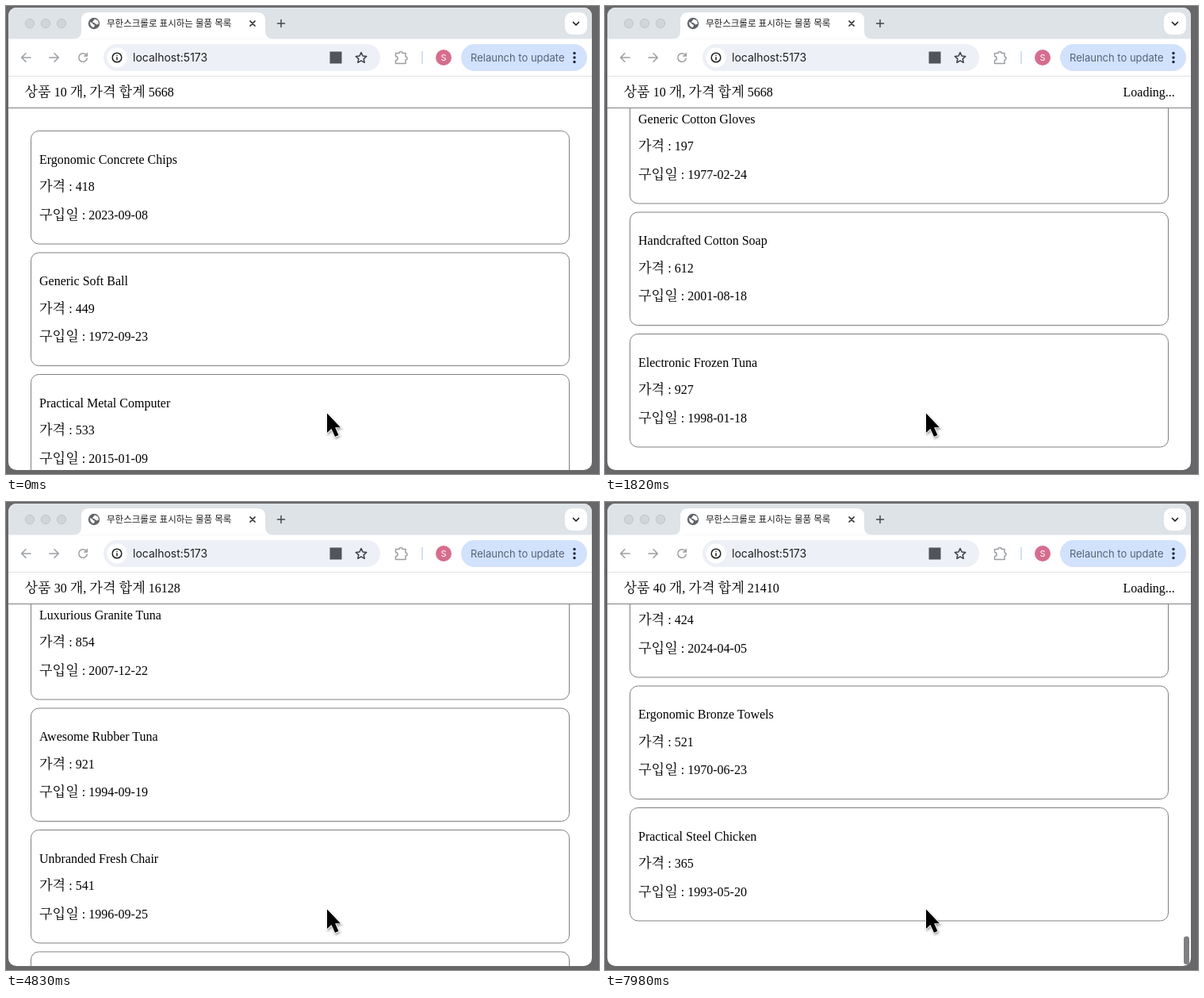
An HTML page for the animation above (8 s loop, 748 by 590 pixels).

```html
<!DOCTYPE html>
<html lang="ko">
<head>
<meta charset="utf-8">
<title>무한스크롤</title>
<style>
  html, body { margin: 0; width: 100%; height: 100%; overflow: hidden; background: #67676a; }
  svg { display: block; width: 748px; height: 590px; }
  text { white-space: pre; }
  .page { font: 16px "Liberation Serif", "Noto Serif CJK KR", "Noto Sans CJK KR", "Noto Sans CJK", serif; fill: #000; }
  .ko { font-size: 17.2px; font-weight: 300; }
  .ui { font-family: Inter, "Noto Sans CJK KR", "Noto Sans CJK", sans-serif; }
  .line { fill: none; stroke-linecap: round; stroke-linejoin: round; }
</style>
</head>
<body>
<svg viewBox="0 0 748 590" xmlns="http://www.w3.org/2000/svg">
  <defs>
    <clipPath id="window"><rect x="3" y="2" width="736" height="583" rx="10"/></clipPath>
    <clipPath id="view"><rect x="3" y="129" width="736" height="456"/></clipPath>
    <filter id="shadow" x="-50%" y="-50%" width="200%" height="200%">
      <feDropShadow dx="1" dy="2" stdDeviation="1.6" flood-opacity=".4"/>
    </filter>
  </defs>
  <rect width="748" height="590" fill="#67676a"/>
  <g clip-path="url(#window)">
    <rect x="3" y="2" width="736" height="583" fill="#fff"/>

    <g class="page">
      <g clip-path="url(#view)"><g id="list"></g></g>
      <path d="M3 128.5H739" stroke="#808080"/>
      <text id="summary" x="23.5" y="113.5"></text>
      <text id="loading" x="653.5" y="113.5">Loading...</text>
    </g>
    <rect id="thumb" x="730" width="7" rx="3.5" fill="#7f7f7f"/>

    <g class="ui">
      <rect x="3" y="2" width="736" height="39.5" fill="#dee3e7"/>
      <g fill="#d2d5d8" stroke="#c3c6c9">
        <circle cx="30" cy="22" r="5.7"/><circle cx="50" cy="22" r="5.7"/><circle cx="70" cy="22" r="5.7"/>
      </g>
      <path d="M85 41.5Q95 41.5 95 32V18Q95 8 105 8H317Q327 8 327 18V32Q327 41.5 337 41.5Z" fill="#fff"/>
      <circle cx="111" cy="22" r="7.2" fill="#5f6368"/>
      <path d="M106 20q3 1 4 3l2 1-1 3q-5 0-5-7zM112 16.5l4 2 1 4-3 1-2-2-3-1 1-2z" fill="#fff"/>
      <text x="127" y="26" font-size="11.5" font-weight="500" fill="#1f1f1f">무한스크롤로 표시하는 물품 목록</text>
      <g class="line" stroke="#2a2b2d" stroke-width="1.7">
        <path d="M308 19l6 6m0-6l-6 6"/>
        <path d="M342.500 22h9m-4.500-4.500v9" stroke="#44474a" stroke-width="1.5"/>
      </g>
      <rect x="705" y="8" width="28" height="28" rx="9" fill="#fff"/>
      <path class="line" d="M715.500 20.500l3.500 3.500 3.500-3.500" stroke="#1f1f1f" stroke-width="1.7"/>

      <path d="M3 88.500H739" stroke="#dfe1e4"/>
      <g class="line" stroke="#9b9ea2" stroke-width="1.5">
        <path d="M31 65H20m5-5.300L19.700 65 25 70.300"/>
        <path d="M55 65H66m-5-5.300L66.300 65 61 70.300"/>
        <path d="M101.500 62a5.300 5.300 0 1 0 .8 4.300M102.300 59.500v3.500h-3.700"/>
        <path d="M491.500 59.500h4.500a2 2 0 0 1 4 0h4v4.500a2 2 0 0 1 0 4v4.500h-12.500v-4a2.300 2.300 0 0 0 0-5z"/>
      </g>
      <rect x="123" y="48" width="349" height="34" rx="17" fill="#edf0f6"/>
      <circle cx="140" cy="65" r="12.500" fill="#fff"/>
      <g class="line" stroke="#1f1f1f" stroke-width="1.500">
        <circle cx="140" cy="65" r="5.800"/><path d="M140 64.800v3M140 62.200v.1"/>
        <path d="M448 58.500l2 4.400 4.800.5-3.600 3.200 1 4.700-4.200-2.400-4.200 2.400 1-4.700-3.600-3.200 4.800-.5z" stroke="#3c4043"/>
      </g>
      <text x="160" y="70" font-size="14" fill="#1f1f1f">localhost:5173</text>
      <rect x="408.500" y="57.500" width="15" height="15" fill="#515458"/>
      <path d="M525 57v16" stroke="#c5d6f2" stroke-width="1.500"/>
      <circle cx="552" cy="65" r="10" fill="#d56d8e"/>
      <text x="552" y="69" font-size="11" fill="#fff" text-anchor="middle">S</text>
      <rect x="574" y="48" width="159" height="34" rx="17" fill="#d2e2fc"/>
      <text x="586" y="69.700" font-size="13" fill="#566179">Relaunch to update</text>
      <g fill="#1f2633"><circle cx="717" cy="59.500" r="1.700"/><circle cx="717" cy="65" r="1.700"/><circle cx="717" cy="70.500" r="1.700"/></g>
    </g>
  </g>
  <path d="M405 513.500V538l5.500-5 4.500 10 4.500-2-4.300-9.800h6.800z" fill="#000" stroke="#fff" stroke-width="1.500"
        paint-order="stroke" filter="url(#shadow)"/>
</svg>
<script>
const LOOP = 8000, STEP = 70;
const FIRST = 157, PITCH = 153.5, FETCH = 1575;
const VIEW = 496, VIEW_TOP = 89;
const $ = id => document.getElementById(id);
const restScroll = count => FIRST + PITCH * (count - 1) - 413;

const known = {
  0: ['Ergonomic Concrete Chips', 418, '2023-09-08'],
  1: ['Generic Soft Ball', 449, '1972-09-23'],
  2: ['Practical Metal Computer', 533, '2015-01-09'],
  8: ['Handcrafted Cotton Soap', 612, '2001-08-18'],
  9: ['Electronic Frozen Tuna', 927, '1998-01-18'],
  15: ['Rustic Plastic Hat', 86, '1981-09-10'],
  16: ['Electronic Fresh Towels', 347, '2015-12-30'],
  17: ['Luxurious Granite Tuna', 854, '2007-12-22'],
  18: ['Awesome Rubber Tuna', 921, '1994-09-19'],
  19: ['Unbranded Fresh Chair', 541, '1996-09-25'],
  27: ['Generic Granite Chicken', 501, '2003-08-04'],
  28: ['Oriental Wooden Shoes', 509, '1984-01-26'],
  29: ['Luxurious Granite Car', 286, '2004-06-25'],
  37: ['Modern Cotton Table', 424, '2024-04-05'],
  38: ['Ergonomic Bronze Towels', 521, '1970-06-23'],
  39: ['Practical Steel Chicken', 365, '1993-05-20']
};
const words = [
  ['Generic', 'Rustic', 'Handmade', 'Practical', 'Elegant', 'Recycled'],
  ['Wooden', 'Soft', 'Metal', 'Cotton', 'Bronze', 'Fresh'],
  ['Chair', 'Gloves', 'Pizza', 'Keyboard', 'Salad', 'Bike']
];

let seed = 7;
const random = n => (seed = seed * 16807 % 2147483647) % n;
const two = n => String(n + 1).padStart(2, '0');
const makeItem = () => [
  words.map(list => list[random(6)]).join(' '),
  100 + random(850),
  `${1970 + random(54)}-${two(random(12))}-${two(random(28))}`
];
const ko = s => s.replace(/[가-힣]+/g, '<tspan class="ko">$&</tspan>');

const cards = Array.from({ length: 40 }, (_, i) => {
  const [name, price, date] = known[i] || makeItem();
  const g = document.createElementNS('http://www.w3.org/2000/svg', 'g');
  g.setAttribute('transform', `translate(0 ${FIRST + PITCH * i})`);
  g.innerHTML = `<rect x="31.5" y=".5" width="679" height="142.5" rx="10" fill="#fff" stroke="#808080"/>
    <text x="42" y="41.5">${name}</text>
    <text x="42" y="76">${ko(`가격 : ${price}`)}</text>
    <text x="42" y="111.5">${ko(`구입일 : ${date}`)}</text>`;
  return $('list').appendChild(g);
});

// load time, item count, price total
const pages = [[0, 10, 5668], [2520, 20, 11088], [4830, 30, 16128], [7070, 40, 21410], [9485]];
const barSpans = [[210, 1680], [2870, 4410], [5250, 6720], [7140, 9000]];
// time, scroll position
const path = [
  [140, 0], [210, 12], [420, 260], [700, 760], [910, 1140], [980, 1341], [1050, 1348],
  [1190, 1265], [1330, 1180], [1540, 1131], [1820, 1125.5],
  [2800, 1125.5], [2870, 1165], [3010, 1720], [3150, 2377.5], [3255, 2675], [3430, 2800],
  [3640, 2825], [3850, 2755], [4060, 2692], [4270, 2667], [4550, 2660.5],
  [5180, 2660.5], [5250, 2700], [5390, 3480], [5530, 4197], [5810, 4223], [5950, 4224],
  [6130, 4262], [6340, 4226], [6560, 4202], [6930, 4195.5],
  [7420, 4195.5], [7490, 4235], [7630, 4850], [7770, 5430], [7910, 5731], [7980, 5758.5]
];

// Monotone cubic interpolation
const slope = i => path[i + 1] && path[i] ? (path[i + 1][1] - path[i][1]) / (path[i + 1][0] - path[i][0]) : 0;
function tangent(i) {
  const a = slope(i - 1), b = slope(i);
  return a * b > 0 ? 2 * a * b / (a + b) : 0;
}
function scrollAt(t) {
  const i = path.findIndex(p => p[0] > t) - 1;
  if (i === -1) return 0;
  if (i < 0) return path[path.length - 1][1];
  const [t0, a] = path[i], [t1, b] = path[i + 1];
  const d = t1 - t0, u = (t - t0) / d, v = 1 - u;
  const y = a * v * v * (1 + 2 * u) + b * u * u * (3 - 2 * u)
    + d * u * v * (v * tangent(i) - u * tangent(i + 1));
  return Math.round(y * 2) / 2;
}

function draw(time) {
  const t = Math.floor(time / STEP) * STEP;
  const next = pages.findIndex(p => p[0] > t);
  const [, count, total] = pages[next - 1];
  const scroll = scrollAt(t), max = restScroll(count);

  $('list').setAttribute('transform', `translate(0 ${-scroll})`);
  cards.forEach((card, i) => card.setAttribute('visibility', i < count ? 'visible' : 'hidden'));
  const label = ko(`상품 ${count} 개, 가격 합계 ${total}`);
  if (draw.label !== label) $('summary').innerHTML = draw.label = label;
  $('loading').setAttribute('visibility', t >= pages[next][0] - FETCH ? 'visible' : 'hidden');

  const size = VIEW * VIEW / (VIEW + max);
  const span = barSpans.find(([a, b]) => t >= a && t < b);
  $('thumb').setAttribute('y', VIEW_TOP + 2 + (VIEW - size) * Math.min(1, scroll / max));
  $('thumb').setAttribute('height', size - 4);
  $('thumb').setAttribute('opacity', span ? Math.min(1, (span[1] - t) / 280) : 0);
}

const start = performance.now();
function tick() {
  draw((performance.now() - start) % LOOP);
  requestAnimationFrame(tick);
}
tick();
</script>
</body>
</html>
```
